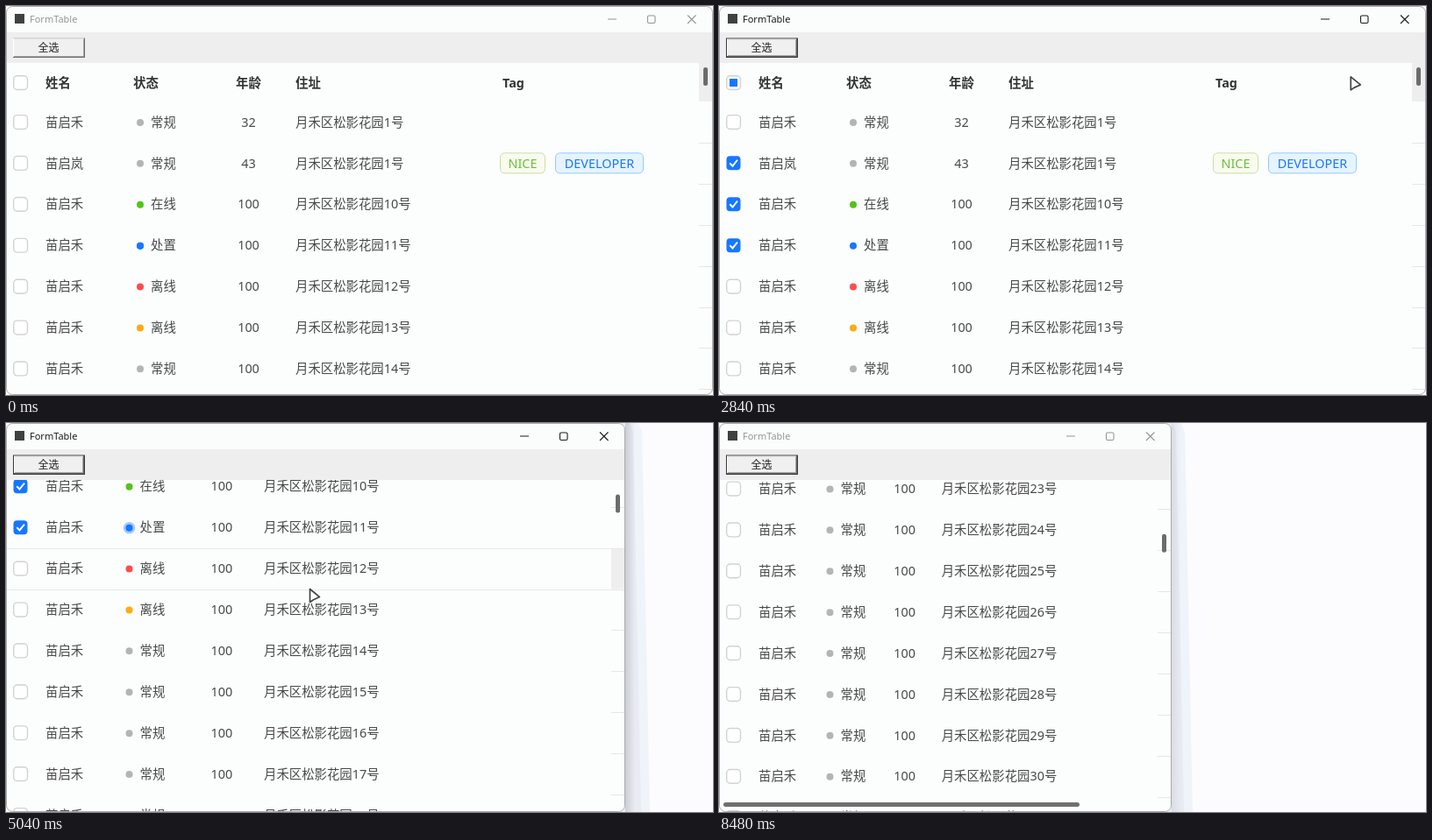
Write an HTML page with a canvas that moves like this. It is 806 px wide and 444 px high and loops after 8560 ms.

```html
<!DOCTYPE html>
<html lang="zh-CN">
<head>
<meta charset="utf-8">
<title>FormTable</title>
<style>
html, body { margin: 0; width: 100%; height: 100%; overflow: hidden; background: #fcfcfe; }
canvas { display: block; }
</style>
</head>
<body>
<canvas width="806" height="444"></canvas>
<script>
const g = document.querySelector('canvas').getContext('2d');
const LOOP = 8560, BEAT = 1240, PAUSE = 240;
const FULL = 806, H = 444, TOP = 65, HEAD = 44, ROW = 46.9;
const FONT = '"Noto Sans", "Noto Sans CJK SC", sans-serif';
const BLUE = '#1677ff', GREEN = '#52c41a', RED = '#ff4d4f', AMBER = '#faad14', GREY = '#b4b4b4';
const TEXT = '#484848';

const between = (t, a, b) => t >= a && t < b;

// Eased 0 to 1 while t goes from a to b.
function ramp(t, a, b) {
  const p = Math.min(1, Math.max(0, (t - a) / (b - a)));
  return p * p * (3 - 2 * p);
}

const checkTime = k => 500 + 400 * k;
const isChecked = (k, t) => between(k, 1, 4) && t >= checkTime(k);
const rowTop = (k, scroll) => TOP + HEAD + k * ROW - scroll;

const widthAt = t => FULL - 100 * ramp(t, 3900, 4100) - 190 * ramp(t, 5640, 5900);

function scrollAt(t) {
  return 541 * ramp(t, 2900, 3480) + 160 * ramp(t, 3720, 3820)
    - 547 * ramp(t, 4400, 5040) - 39 * ramp(t, 5120, 5300)
    - 115 * ramp(t, 6280, 6560) + 761 * ramp(t, 7440, 8100);
}

// Every move of the pointer takes 300 ms and ends at the given time.
function pointerAt(t, w, thumbY) {
  let x = 70, y = 400;
  const go = (end, toX, toY) => {
    const p = ramp(t, end - 300, end);
    x += (toX - x) * p;
    y += (toY - y) * p;
  };
  for (let k = 1; k < 4; k++) go(checkTime(k) - 100, 18, rowTop(k, 0) + ROW / 2);
  go(2000, 22, 101);
  go(2900, w - 8, thumbY + 8);
  go(3900, w + 1, 137);
  go(4500, 346, 189);
  go(5600, w + 1, 170);
  go(6200, 228, 158);
  go(7100, w - 8, thumbY + 8);
  go(8350, w + 20, 150);
  return { x, y };
}

function sceneAt(t) {
  const w = widthAt(t), scroll = scrollAt(t), thumbY = 70 + scroll * 0.0745;
  const clicking = [1, 2, 3].some(k => Math.abs(t - checkTime(k)) < 60);
  return {
    t, w, scroll, thumbY,
    active: between(t, 80, 8400),
    focused: t >= 2160,
    pressed: clicking || between(t, 2900, 3820) || between(t, 7400, 8100),
    resizing: between(t, 3880, 4200) || between(t, 5560, 5940),
    mouse: pointerAt(t, w, thumbY)
  };
}

function rect(x, y, w, h, color) {
  g.fillStyle = color;
  g.fillRect(x, y, w, h);
}

function paint(fill, stroke, line) {
  if (fill) { g.fillStyle = fill; g.fill(); }
  if (stroke) { g.strokeStyle = stroke; g.lineWidth = line; g.stroke(); }
}

function box(x, y, w, h, r, fill, stroke, line = 1) {
  g.beginPath();
  g.roundRect(x, y, w, h, r);
  paint(fill, stroke, line);
}

function disc(x, y, r, color) {
  g.beginPath();
  g.arc(x, y, r, 0, 7);
  paint(color);
}

function shape(points, fill, stroke, line) {
  g.beginPath();
  points.forEach(([x, y]) => g.lineTo(x, y));
  if (fill) g.closePath();
  paint(fill, stroke, line);
}

function label(s, x, y, { color = TEXT, size = 14.4, weight = 400, align = 'left' } = {}) {
  g.font = `${weight} ${size}px ${FONT}`;
  g.textAlign = align;
  g.fillStyle = color;
  g.fillText(s, x, y + size * 0.36);
}

function checkbox(y, state) {
  if (state === 'on') {
    box(8.5, y - 8, 16, 16, 4, BLUE);
    shape([[12.3, y], [15.5, y + 3.3], [21, y - 3.6]], null, '#fff', 2);
    return;
  }
  box(8.7, y - 7.8, 15.8, 15.8, 4, '#fff', '#d2d2d2', 1.4);
  if (state === 'part') rect(12, y - 4.5, 9, 9, BLUE);
}

function tag(s, x, y, w, color, fill, border) {
  box(x + 0.5, y - 11.5, w - 1, 23, 5, fill, border);
  label(s, x + w / 2, y, { color, align: 'center' });
}

function status(k) {
  if (k === 2) return ['在线', GREEN];
  if (k === 3) return ['处置', BLUE];
  if (k === 4) return ['离线', RED];
  if (k === 5) return ['离线', AMBER];
  return ['常规', GREY];
}

function backdrop({ w, active }) {
  rect(0, 0, FULL, H, '#fcfcfe');
  if (w === FULL) return;
  const band = (edge, color) =>
    shape([[w - 9, 0], [w + edge - 4, 0], [w + edge, 10], [w + edge + 9, H], [w - 9, H]], color);
  band(active ? 19 : 15, '#eff3fa');
  band(active ? 9 : 5, '#e8ebf2');
  const shade = g.createLinearGradient(w, 0, w + 11, 0);
  shade.addColorStop(0, `rgba(60,60,60,${active ? 0.17 : 0.08})`);
  shade.addColorStop(1, 'rgba(60,60,60,0)');
  rect(w, 0, 11, H, shade);
}

function titleBar({ w, active }) {
  const ink = active ? '#1c1c1c' : '#969696';
  rect(0, 0, w, 30, '#fbfcfc');
  rect(10, 9, 11, 11, '#404040');
  label('FormTable', 27, 15.5, { color: ink, size: 11 });
  rect(w - 120, 14.5, 10, 1, ink);
  box(w - 74.5, 11, 8.5, 8.5, 1.5, null, ink, 1.1);
  shape([[w - 29, 10.5], [w - 19.5, 20]], null, ink, 1.1);
  shape([[w - 19.5, 10.5], [w - 29, 20]], null, ink, 1.1);
}

function toolBar({ w, focused }) {
  rect(0, 30, w, 35, '#eee');
  const i = focused ? 1 : 0;
  const layer = (left, right, color) =>
    rect(8 + left, 36.5 + left, 82 - left - right, 22.5 - left - right, color);
  if (focused) layer(0, 0, '#383838');
  layer(i, i, '#686868');
  layer(i, i + 1, '#fff');
  layer(i + 1, i + 1, '#a8a8a8');
  layer(i + 1, i + 2, '#f0f0f0');
  label('全选', 48.5, 48, { color: '#222', size: 12, align: 'center' });
}

function table({ t, w, scroll, thumbY, active, mouse }) {
  const squeeze = Math.min((FULL - w) / 100, 2.12);
  const stateX = 165 - 12.5 * squeeze, ageX = 276.5 - 30.6 * squeeze;
  const homeX = 330 - 36 * squeeze, tagX = 563 - 65 * squeeze;
  const strip = w - 16;
  const underMouse = Math.floor((mouse.y - rowTop(0, scroll)) / ROW);
  const hovered = active && mouse.y > TOP && mouse.x < strip ? underMouse : -1;

  g.save();
  g.beginPath();
  g.rect(0, TOP, w, H - TOP);
  g.clip();
  rect(0, TOP, w, H - TOP, '#fcfdfd');

  const headY = 87.5 - scroll;
  const heading = (s, x, align) => label(s, x, headY, { color: '#333', weight: 700, align });
  rect(strip, TOP - scroll, 16, HEAD, '#eee');
  checkbox(headY, isChecked(1, t) ? 'part' : '');
  heading('姓名', 45);
  heading('状态', stateX - 20);
  heading('年龄', ageX, 'center');
  heading('住址', homeX);
  heading('Tag', tagX + 3);

  const first = Math.max(0, Math.floor((scroll - HEAD) / ROW));
  for (let k = first; k < first + 11; k++) {
    const top = rowTop(k, scroll), y = top + ROW / 2;
    const [state, color] = status(k);
    if (k === hovered) {
      rect(strip, top, 16, ROW, '#eee');
      rect(0, Math.round(top), w, 1, '#e9e9e9');
      rect(0, Math.round(top + ROW), w, 1, '#e9e9e9');
    }
    rect(strip, Math.round(top + ROW), 16, 1, '#e6e6e6');
    checkbox(y, isChecked(k, t) ? 'on' : '');
    label(k === 1 ? '苗启岚' : '苗启禾', 45, y);
    if (k === 3) {
      const p = t % 800 / 800;
      if (p < 0.5) disc(stateX - 12, y + 0.5, 4 + 9 * p, `rgba(22,119,255,${1 - 2 * p})`);
    }
    disc(stateX - 12, y + 0.5, 4, color);
    label(state, stateX, y);
    label(k < 2 ? 32 + 11 * k : 100, ageX, y, { align: 'center' });
    label(`月禾区松影花园${k < 2 ? 1 : k + 8}号`, homeX, y);
    if (k === 1) {
      tag('NICE', tagX, y, 52, '#6abf3a', '#f8fbee', '#c9e0a4');
      tag('DEVELOPER', tagX + 63, y, 101, BLUE, '#e6f4ff', '#91caff');
    }
  }
  box(w - 11, thumbY, 5, 21, 2.5, '#6c6c6c');
  if (w < 595) box(5, 433, 406, 5, 2.5, '#6f6f6f');
  g.restore();
}

function pointer({ mouse: { x, y }, pressed, resizing }) {
  if (pressed) disc(x - 1, y + 1, 11, 'rgba(248,244,60,.68)');
  g.save();
  g.translate(x, y);
  g.lineJoin = 'round';
  if (resizing) {
    for (const side of [-1, 1]) {
      const arrow = [[10, 0], [6, -4], [6, -1], [2.5, -1], [2.5, 1], [6, 1], [6, 4]];
      shape(arrow.map(([a, b]) => [a * side, b]), '#111', '#fff', 1);
    }
  } else {
    shape([[0.5, 0.5], [0.5, 15.5], [4.5, 12.8], [11.5, 9.6]], '#fff', '#444', 1.7);
  }
  g.restore();
}

function draw(now) {
  const time = now % LOOP;
  // The picture rests at the end of every beat.
  const phase = (time + PAUSE) % BEAT;
  const scene = sceneAt(phase < PAUSE ? time - phase : time);

  backdrop(scene);
  g.save();
  g.beginPath();
  g.roundRect(0, 0, scene.w, H, 7);
  g.clip();
  titleBar(scene);
  toolBar(scene);
  table(scene);
  g.restore();
  box(0.5, 0.5, scene.w - 1, H - 1, 7, null, '#a9a9a9');
  if (scene.active) pointer(scene);
}

const start = performance.now();
function tick() {
  draw(performance.now() - start);
  requestAnimationFrame(tick);
}
tick();
</script>
</body>
</html>
```
